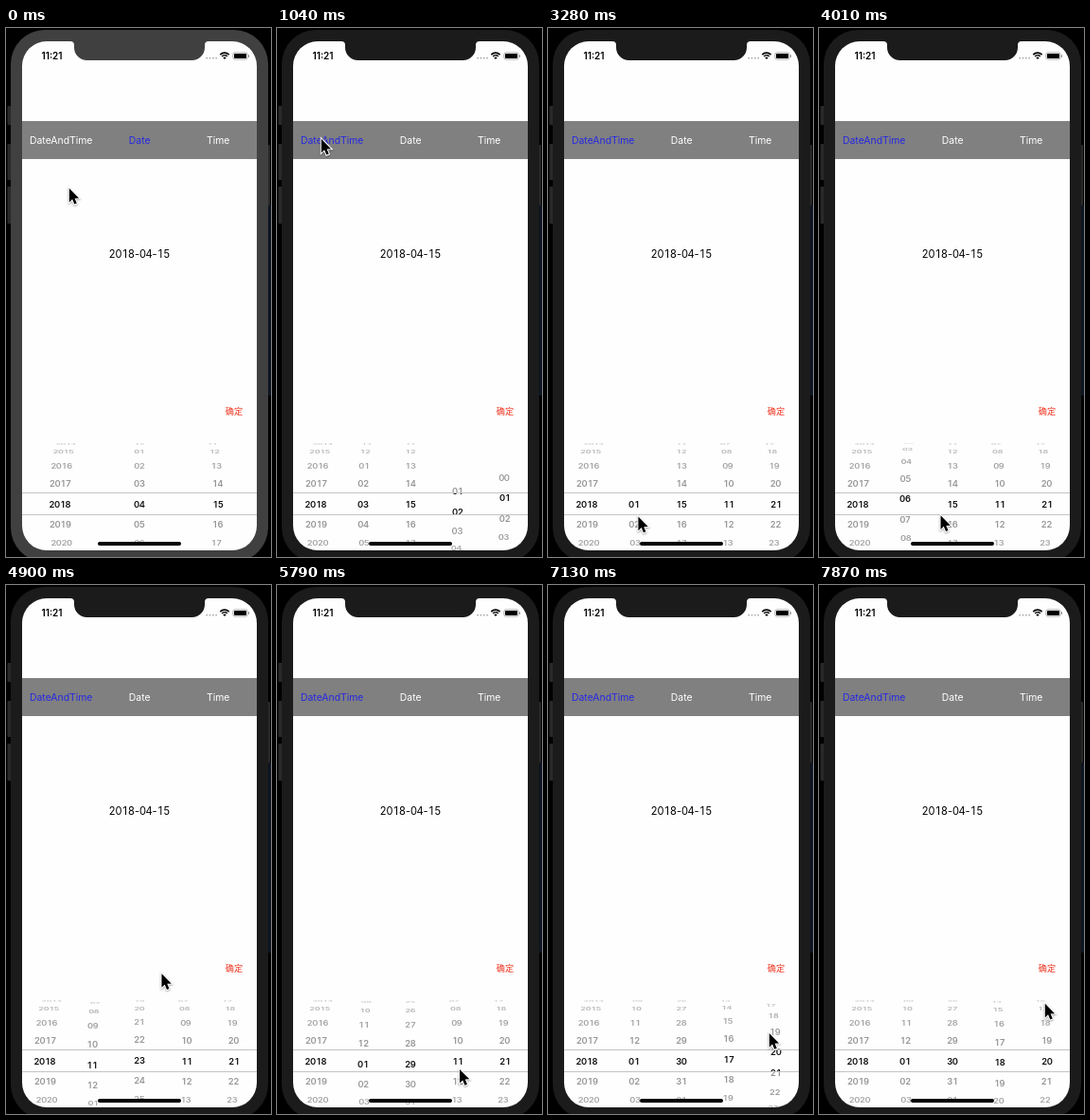
Animation of 280 by 557 pixels, one loop 8000 ms. Source, as an HTML page with a canvas:

```html
<!DOCTYPE html>
<html lang="en">
<head>
<meta charset="utf-8">
<title>Date picker</title>
<style>
html, body { margin: 0; width: 100%; height: 100%; overflow: hidden; background: #000; }
canvas { display: block; width: 280px; height: 557px; }
</style>
</head>
<body>
<canvas id="stage"></canvas>
<script>
const W = 280, H = 557, LOOP = 8000, STEP = 148.5;
const canvas = document.getElementById('stage');
const ctx = canvas.getContext('2d');
const dpr = window.devicePixelRatio || 1;
canvas.width = W * dpr;
canvas.height = H * dpr;

const SANS = 'Inter, "Liberation Sans", sans-serif';
const MID = 141, ROW_Y = 501.5, RADIUS = 64, ROW_ANGLE = 0.343;
const SWITCH = 7; // step at which the five-column picker appears

// Where the pointer passes: step, x, y.
const stops = [
  [0, 66, 168], [4, 46, 116], [7, 46, 116], [11, 264, 406], [12, 264, 406], [15, 208, 482],
  [20, 88, 514], [21, 88, 514], [29, 141, 512], [38, 192, 513], [44, 193, 490],
  [45, 230, 490], [53, 238, 440]
];

const progress = (k, from, to) => Math.min(1, Math.max(0, (k - from) / (to - from)));

// A wheel let go at one step that slows to rest at another.
const flick = (k, from, to, start, end, power = 2) =>
  end - (end - start) * (1 - progress(k, from, to)) ** power;

// Upward swipe and return, on top of the pointer's path.
const swipe = (k, from, to, height) => height * Math.sin(Math.PI * progress(k, from, to));

function pointerAt(k) {
  const i = Math.max(1, stops.findIndex(s => s[0] >= k));
  const [a, ax, ay] = stops[i - 1], [b, bx, by] = stops[i];
  const u = progress(k, a, b);
  const lift = swipe(k, 2, 4, 20) + swipe(k, 22, 27, 150) + swipe(k, 30, 36, 104) + swipe(k, 39, 44, 64);
  return [ax + (bx - ax) * u, ay + (by - ay) * u - lift];
}

const two = n => String(n).padStart(2, '0');
const cycle = n => i => i < 1 ? '' : two((i - 1) % n + 1);
const year = i => String(i);
const month = cycle(12);
const day = cycle(31);
const hour = i => i < 1 ? '' : two(i % 24);
const minute = i => i < 0 ? '' : two(i % 60);

function columnsAt(k) {
  if (k < SWITCH) return [[57, year, 2018], [MID, month, 16], [224, day, 15]];
  const monthPos = k < 20 ? flick(k, SWITCH, 11, 15, 1) : flick(k, 22.3, 41, 1, 13);
  const hourPos = k < 20 ? flick(k, SWITCH, 11, 1.64, 11) : flick(k, 39.6, 56.5, 11, 18, 3);
  const minutePos = k < 20 ? flick(k, SWITCH, 11, 1.32, 21) : flick(k, 47, 50, 21, 20);
  return [
    [41, year, 2018],
    [91, month, monthPos],
    [141, day, flick(k, 29.5, 49.5, 15, 30, 4)],
    [191, hour, hourPos],
    [241, minute, minutePos]
  ];
}

function box(x, y, w, h, r, color) {
  ctx.beginPath();
  ctx.roundRect(x, y, w, h, r);
  ctx.fillStyle = color;
  ctx.fill();
}

function label(text, x, y, size, color, weight = 400, family = SANS) {
  ctx.font = `${weight} ${size}px ${family}`;
  ctx.textAlign = 'center';
  ctx.fillStyle = color;
  ctx.fillText(text, x, y + size * 0.364);
}

// Figures of equal advance, centred on x.
function figures(text, x, y, size, color, weight) {
  const advance = c => size * (c === '-' ? 0.46 : 0.61);
  let left = x - [...text].reduce((sum, c) => sum + advance(c), 0) / 2;
  for (const c of text) {
    label(c, left + advance(c) / 2, y, size, color, weight);
    left += advance(c);
  }
}

function wheel(x, pos, format, color, fade) {
  for (let i = Math.ceil(pos - 4.4); i <= pos + 4.4; i++) {
    const angle = (i - pos) * ROW_ANGLE, c = Math.cos(angle);
    const text = format(i);
    if (c < 0.06 || !text) continue;
    const s = 1 - 0.09 * (1 - c);
    ctx.save();
    ctx.translate(MID + (x - MID) * s, ROW_Y + RADIUS * Math.sin(angle));
    ctx.scale(s, c);
    if (fade) ctx.globalAlpha = 0.3 + 0.7 * c;
    figures(text, 0, 0, 9.4, color, 600);
    ctx.restore();
  }
}

function picker(columns) {
  const band = (y, h, color, fade) => {
    ctx.save();
    ctx.beginPath();
    ctx.rect(17, y, 248, h);
    ctx.clip();
    columns.forEach(([x, format, pos]) => wheel(x, pos, format, color, fade));
    ctx.restore();
  };
  band(436, 53, '#929292', true);
  band(489, 24, '#111', false);
  band(513, 37, '#929292', true);
  ctx.fillStyle = '#c4c4c4';
  ctx.fillRect(17, 489, 248, 1);
  ctx.fillRect(17, 512, 248, 1);
}

function statusBar() {
  label('11:21', 48.5, 29.5, 10, '#000', 600);
  for (let i = 0; i < 4; i++) box(211.3 + i * 3.3, 30.8, 1.8, 1.8, 0.9, '#aaa');
  ctx.strokeStyle = '#000';
  ctx.lineWidth = 1.6;
  for (const r of [3.8, 6.4]) {
    ctx.beginPath();
    ctx.arc(231, 32.5, r, -Math.PI * 0.76, -Math.PI * 0.24);
    ctx.stroke();
  }
  ctx.beginPath();
  ctx.moveTo(231, 33);
  ctx.arc(231, 33, 2.4, -Math.PI * 0.76, -Math.PI * 0.24);
  ctx.fillStyle = '#000';
  ctx.fill();
  ctx.beginPath();
  ctx.roundRect(239.9, 25.9, 15.2, 7.2, 2);
  ctx.strokeStyle = '#888';
  ctx.lineWidth = 0.7;
  ctx.stroke();
  box(241, 27, 13, 5, 1, '#000');
  box(255.9, 28.2, 1.1, 2.6, 0.5, '#888');
}

function phone(color) {
  ctx.fillStyle = '#0d1322';
  ctx.fillRect(277, 187, 3, 200);
  for (const [y, h] of [[82, 20], [122, 38], [167, 39]]) box(1.5, y, 5, h, 1, '#292929');
  box(275, 123, 4, 64, 1, '#292929');
  box(5, 2, 272, 560, 36, color);
  box(17, 14, 248, 536, 26, '#fefefe');
}

function notch(color) {
  ctx.beginPath();
  ctx.moveTo(68, 13);
  ctx.lineTo(68, 14);
  ctx.arcTo(72, 14, 72, 18, 4);
  ctx.arcTo(72, 34, 86, 34, 13.5);
  ctx.arcTo(210, 34, 210, 18, 13.5);
  ctx.arcTo(210, 14, 214, 14, 4);
  ctx.lineTo(214, 13);
  ctx.fillStyle = color;
  ctx.fill();
}

function pointer(x, y) {
  const shape = [[0, 0], [0, 14.6], [3.3, 11.5], [5.5, 16.8], [8, 15.8], [5.8, 10.6], [10.3, 10.4]];
  ctx.save();
  ctx.translate(x + 0.8, y + 0.8);
  ctx.beginPath();
  shape.forEach(p => ctx.lineTo(...p));
  ctx.closePath();
  ctx.shadowColor = 'rgba(0,0,0,.35)';
  ctx.shadowBlur = 2 * dpr;
  ctx.shadowOffsetY = dpr;
  ctx.strokeStyle = '#fff';
  ctx.lineWidth = 2;
  ctx.stroke();
  ctx.shadowColor = 'transparent';
  ctx.fillStyle = '#000';
  ctx.fill();
  ctx.restore();
}

function draw(k) {
  const full = k >= SWITCH;
  const shell = full ? '#1b1b1b' : '#404040';
  ctx.setTransform(dpr, 0, 0, dpr, 0, 0);
  ctx.fillStyle = '#000';
  ctx.fillRect(0, 0, W, H);
  phone(shell);
  notch(shell);
  statusBar();

  ctx.fillStyle = '#808080';
  ctx.fillRect(17, 98, 248, 40);
  ['DateAndTime', 'Date', 'Time'].forEach((name, i) => {
    const on = i === (full ? 0 : 1);
    label(name, 58.2 + i * 83, 118.3, 10.4, on ? '#2628e2' : '#fff');
  });
  figures('2018-04-15', MID, 238.4, 11.1, '#000', 400);
  label('确定', 241, 403.3, 9.2, '#f0331f', 400, '"Noto Sans CJK SC", "Noto Sans CJK", sans-serif');

  picker(columnsAt(k));
  box(97, 541, 88, 4, 2, '#000');
  pointer(...pointerAt(k));
}

function tick(now) {
  draw(Math.floor((now % LOOP + 6) / STEP));
  requestAnimationFrame(tick);
}
draw(0);
requestAnimationFrame(tick);
</script>
</body>
</html>
```
